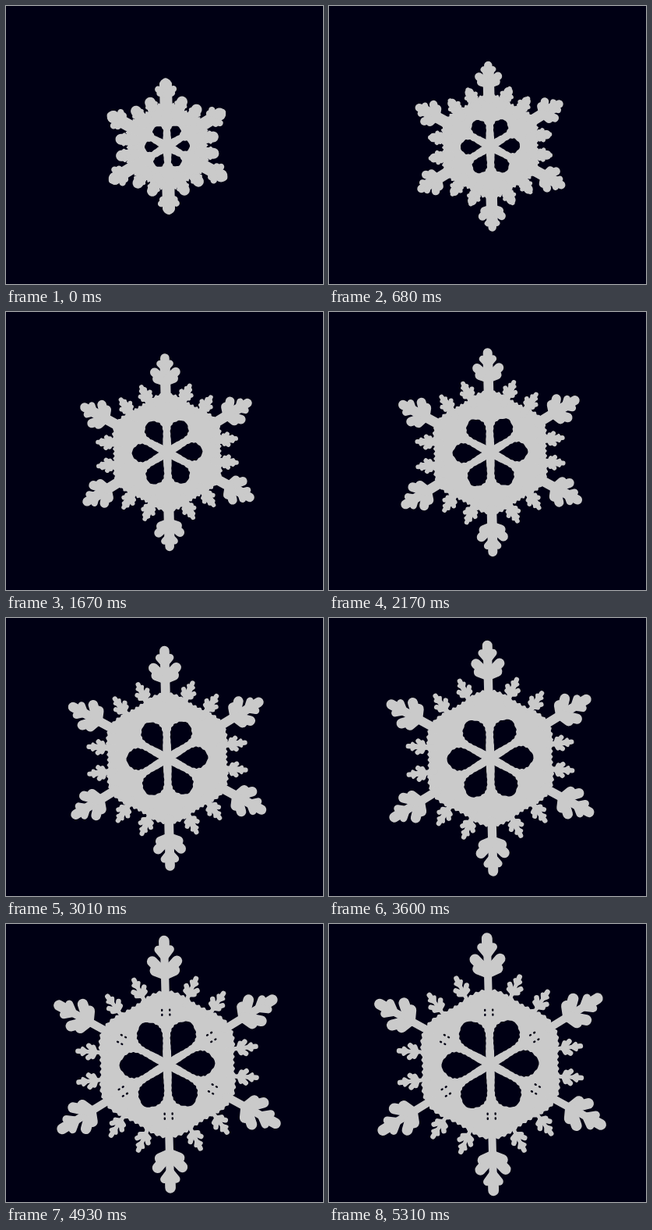
An HTML page with a canvas for the animation above (9270 ms loop, 407 px wide and 356 px high).

```html
<!DOCTYPE html>
<html lang="en">
<head>
<meta charset="utf-8">
<title>Growing snowflake</title>
<style>
html, body { margin: 0; width: 100%; height: 100%; overflow: hidden; background: #000014; }
canvas { display: block; }
</style>
</head>
<body>
<canvas id="stage" width="407" height="356"></canvas>
<script>
const ctx = document.getElementById('stage').getContext('2d');
const NIGHT = '#000014', ICE = '#cacaca';
const LOOP = 9270;
const TILT = -0.026;
const SIXTH = Math.PI / 3;
const changes = [200, 400, 580, 680, 880, 1090, 1290, 1490, 1670, 1870, 2170,
  2450, 2720, 3010, 3390, 3600, 3990, 4280, 4660, 4930, 5310];
const last = changes.length;
const SMALL = 87.5, LARGE = 168.5;

// The first two steps grow twice as fast as the rest.
const radiusAt = step => step < 2 ? SMALL + 7 * step : LARGE - 3.5 * (last - step);
const lerp = (a, b, t) => a + (b - a) * t;

function turned(angle, paint) {
  ctx.save();
  ctx.rotate(angle);
  paint();
  ctx.restore();
}

function limb(x1, y1, x2, y2, half, color = ICE) {
  ctx.strokeStyle = color;
  ctx.lineWidth = 2 * half;
  ctx.lineCap = 'round';
  ctx.beginPath();
  ctx.moveTo(x1, y1);
  ctx.lineTo(x2, y2);
  ctx.stroke();
}

// A lobed leaf growing along the x axis.
function leaf(length, half, stem) {
  const lobe = 0.3 * half;
  limb(-0.2 * length, 0, 0.7 * length, 0, stem);
  limb(0.7 * length, 0, length - lobe, 0, lobe);
  for (const side of [-1, 1]) {
    limb(0.24 * length, 0, 0.32 * length, side * 0.55 * half, lobe);
    limb(0.24 * length, 0, 0.5 * length, side * 0.7 * half, lobe);
    limb(0.58 * length, 0, 0.73 * length, side * 0.34 * half, 0.22 * half);
  }
}

function ring(size) {
  ctx.fillStyle = ICE;
  ctx.beginPath();
  for (let a = 0; a < 2 * Math.PI; a += 0.01) {
    const r = size * (1.04 + 0.05 * Math.cos(6 * a)) + Math.cos(72 * a);
    ctx.lineTo(r * Math.cos(a), r * Math.sin(a));
  }
  ctx.fill();
}

// A drop-shaped opening with beaded edges.
function hole(from, to, half) {
  const edge = x => {
    const p = (x - from) / (to - from);
    return half * Math.sin(Math.PI * p ** 1.6) ** 0.7 - 0.7 * p * Math.cos(1.1 * x);
  };
  ctx.fillStyle = NIGHT;
  ctx.beginPath();
  for (let x = from; x < to; x += 0.5) ctx.lineTo(x, edge(x));
  for (let x = to - 0.5; x > from; x -= 0.5) ctx.lineTo(x, -edge(x));
  ctx.fill();
}

function arm(growth, radius) {
  const neck = lerp(59, 101, growth);
  ctx.save();
  ctx.translate(neck, 0);
  leaf(radius - neck, 14 + 9 * growth ** 0.7, lerp(8, 5, growth));
  ctx.restore();

  const length = lerp(20, 34, growth);
  for (const side of [-1, 1]) {
    const angle = side * 0.44;
    ctx.save();
    ctx.translate(lerp(62, 114, growth), side * lerp(23, 42, growth));
    ctx.rotate(angle);
    ctx.translate(-length, 0);
    leaf(length, lerp(8.5, 11, growth), lerp(7, 2.5, growth));
    ctx.restore();
  }
}

function draw(step) {
  const radius = radiusAt(step);
  const growth = (radius - SMALL) / (LARGE - SMALL);
  const opening = lerp(29.5, 63, growth);
  const eachArm = paint => {
    for (let i = 0; i < 6; i++) turned(i * SIXTH, paint);
  };

  ctx.setTransform(1, 0, 0, 1, 0, 0);
  ctx.fillStyle = NIGHT;
  ctx.fillRect(0, 0, 407, 356);
  ctx.translate(207, 179.7);
  ctx.rotate(TILT - Math.PI / 2);

  ring(lerp(52, 88, growth));
  eachArm(() => arm(growth, radius));
  eachArm(() => {
    turned(SIXTH / 2, () => hole(10.5, opening, 0.3 * opening - 2));
    if (growth < 0.95) return;
    for (const side of [-1, 1]) {
      limb(63, side * 5, 64, side * 5, 1.2, NIGHT);
      limb(69, side * 5, 70, side * 5, 1.2, NIGHT);
    }
  });
}

let shown = -1;
const start = performance.now();
function tick() {
  const time = (performance.now() - start) % LOOP;
  const step = changes.filter(t => t <= time).length;
  if (step !== shown) draw(shown = step);
  requestAnimationFrame(tick);
}
tick();
</script>
</body>
</html>
```
